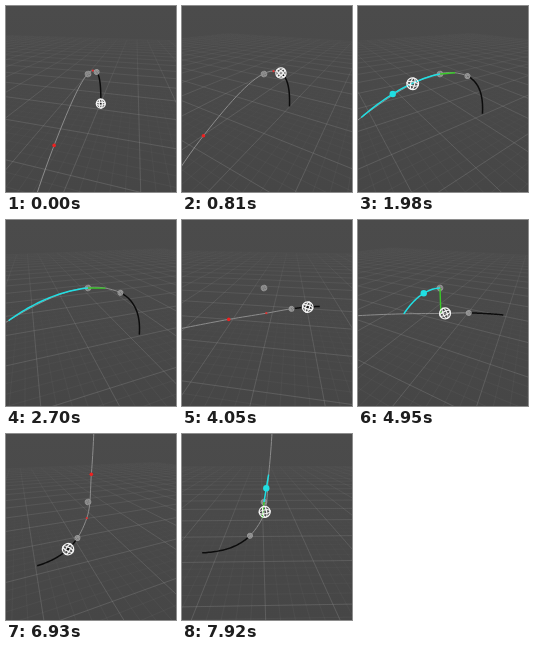
Animation, 170 px wide and 186 px high, one loop 8 s. Source, as an HTML page with a canvas:

```html
<!DOCTYPE html>
<html lang="en">
<head>
<meta charset="utf-8">
<title>Throw prediction</title>
<style>
html, body { margin: 0; width: 100%; height: 100%; overflow: hidden; background: #484848; }
canvas { display: block; }
</style>
</head>
<body>
<canvas id="stage" width="170" height="186"></canvas>
<script>
const ctx = document.getElementById('stage').getContext('2d');
const W = 170, H = 186, LOOP = 8000, STEP = 90;
const RAD = Math.PI / 180, SPIN = 20.7;
const FOCAL = 161, PITCH = 27 * RAD, COS = Math.cos(PITCH), SIN = Math.sin(PITCH);
const GROUND = -75, NEAR = 12;

// Points are [distance along the throw, height], relative to the fixed handle:
// start, release, closest approach, interception, far end.
const throws = [
  { start: 0, flight: 1.85, yaw: 16.5, side: 0,
    points: [[-71, -71], [-37, -9], [-19, -2], [78, -24], [150, -85]] },
  { start: 3.69, flight: 1.05, yaw: -11, side: 5,
    points: [[-66, -27], [-30, -25], [-1, -26], [38, -27], [150, -36]] },
  { start: 6.39, flight: 1.4, yaw: 76, side: 0,
    points: [[-66, -38], [-17, -34], [-2, -17], [5, 26], [8, 110]] }
];
const LEAD = 0.81;

for (const shot of throws) {
  shot.knots = [0];
  shot.points.forEach((p, i, all) => {
    if (i) shot.knots.push(shot.knots[i - 1] + Math.hypot(p[0] - all[i - 1][0], p[1] - all[i - 1][1]));
  });
}

// Smooth curve through the points, indexed by chord length.
function pathPoint({ points, knots }, s) {
  const last = points.length - 1;
  let i = 0;
  while (i < last - 1 && s > knots[i + 1]) i++;
  const span = knots[i + 1] - knots[i], u = (s - knots[i]) / span;
  const slope = (k, axis) => (points[k + 1][axis] - points[k][axis]) / (knots[k + 1] - knots[k]);
  const tangent = (k, axis) => {
    if (k === 0) return 2 * slope(0, axis) - tangent(1, axis);
    if (k === last) return 2 * slope(last - 1, axis) - tangent(last - 1, axis);
    const before = knots[k] - knots[k - 1], after = knots[k + 1] - knots[k];
    return (slope(k - 1, axis) * after + slope(k, axis) * before) / (before + after);
  };
  return [0, 1].map(axis => {
    const p = points[i][axis], q = points[i + 1][axis];
    const m = tangent(i, axis) * span, n = tangent(i + 1, axis) * span;
    return p + u * (m + u * (3 * (q - p) - 2 * m - n + u * (2 * (p - q) + m + n)));
  });
}

const depth = (h, z) => FOCAL - z * COS - h * SIN;

// x points right, h up and z towards the viewer; the third value is the scale.
function project(x, h, z) {
  const k = FOCAL / Math.max(NEAR, depth(h, z));
  return [82 + x * k, 93 - (25 + h * COS - z * SIN) * k, k];
}

function line(points, color, width) {
  ctx.beginPath();
  points.forEach(([x, y]) => ctx.lineTo(x, y));
  ctx.strokeStyle = color;
  ctx.lineWidth = width;
  ctx.stroke();
}

function dot([x, y], r, color) {
  ctx.beginPath();
  ctx.arc(x, y, r, 0, 7);
  ctx.fillStyle = color;
  ctx.fill();
}

function wireBall([x, y], r, color, width, angle) {
  ctx.save();
  ctx.translate(x, y);
  ctx.rotate(angle);
  ctx.strokeStyle = color;
  ctx.lineWidth = width;
  for (const [rx, ry] of [[r, r], [r, r * 0.35], [r * 0.35, r]]) {
    ctx.beginPath();
    ctx.ellipse(0, 0, rx, ry, 0, 0, 7);
    ctx.stroke();
  }
  ctx.restore();
}

function fade(top, bottom, alpha) {
  const g = ctx.createLinearGradient(0, top, 0, bottom);
  g.addColorStop(0, 'rgba(145,145,145,0)');
  g.addColorStop(1, `rgba(145,145,145,${alpha})`);
  return g;
}

function grid(t, gap, extent, style) {
  const a = (15 + SPIN * t) * RAD, c = Math.cos(a), s = Math.sin(a);
  const segment = (p, q) => {
    const dp = depth(GROUND, p[1]) - NEAR, dq = depth(GROUND, q[1]) - NEAR;
    if (dp < 0 && dq < 0) return;
    const cut = (from, to, df, dt) => df >= 0 ? from :
      from.map((v, i) => v + (to[i] - v) * df / (df - dt));
    const ends = [cut(p, q, dp, dq), cut(q, p, dq, dp)];
    line(ends.map(([x, z]) => project(x, GROUND, z)), style, 0.8);
  };
  for (let d = -extent; d <= extent; d += gap) {
    segment([-extent * c - d * s, -extent * s + d * c], [extent * c - d * s, extent * s + d * c]);
    segment([d * c + extent * s, d * s - extent * c], [d * c - extent * s, d * s + extent * c]);
  }
}

function draw(t) {
  const sky = ctx.createLinearGradient(0, 0, 0, H);
  sky.addColorStop(0, '#4b4b4b');
  sky.addColorStop(0.25, '#4a4a4a');
  sky.addColorStop(1, '#464646');
  ctx.fillStyle = sky;
  ctx.fillRect(0, 0, W, H);
  grid(t, 12, 240, fade(70, 186, 0.11));
  grid(t, 60, 960, fade(20, 90, 0.3));

  const shot = throws.filter(s => t >= s.start).pop();
  const { points, knots, side } = shot;
  const turn = (shot.yaw + SPIN * t) * RAD, c = Math.cos(turn), s = Math.sin(turn);
  const place = ([r, h], offset = side) => project(-r * s + offset * c, h, r * c + offset * s);
  const at = d => place(pathPoint(shot, d));
  const trace = (from, to) => Array.from({ length: 41 }, (_, i) => at(from + (to - from) * i / 40));

  const age = t - shot.start, progress = (age - LEAD) / shot.flight;
  const launched = progress > 0.02, flying = progress < 1;
  const anchor = project(0, 0, 0), release = place(points[1]);
  const closest = place(points[2]), target = place(points[3]);

  line(trace(knots[1], knots[4]), '#8c8c8c', 1);
  line(trace(0, knots[1]), '#0c0c0c', 1.5);
  wireBall(anchor, 2.8, '#909090', 1.1, 0.4);
  wireBall(release, 2.4, '#989898', 1, 0.4);

  if (launched) {
    const [er, eh] = points[3];
    const bend = [er / 2, Math.max(0, eh / 2)];
    const intercept = u => {
      const b = 2 * u * (1 - u), e = u * u;
      return place([b * bend[0] + e * er, b * bend[1] + e * eh], side * (b / 2 + e));
    };
    line(trace(knots[2], knots[2]).slice(0, 1).concat([anchor]), '#39c928', 1.4);
    line(Array.from({ length: 31 }, (_, i) => intercept(i / 30)), '#20dfe3', 1.5);
    if (flying) dot(intercept(progress), 3.2, '#20dfe3');
  } else {
    dot(closest, 1.1, '#e03232');
    dot(target, 1.8, '#ee2020');
  }

  if (flying) {
    const ahead = Math.max(0, progress) ** 1.2;
    const distance = launched ? knots[1] + (knots[3] - knots[1]) * ahead
      : knots[1] * Math.min(1, age / LEAD);
    const ball = at(distance);
    wireBall(ball, 5.6 * Math.sqrt(ball[2]), '#f4f4f4', 1.2, age * 0.9);
  }
}

function tick(now) {
  const t = now % LOOP;
  draw(Math.floor(t / STEP) * STEP / 1000);
  requestAnimationFrame(tick);
}
draw(0);
requestAnimationFrame(tick);
</script>
</body>
</html>
```
